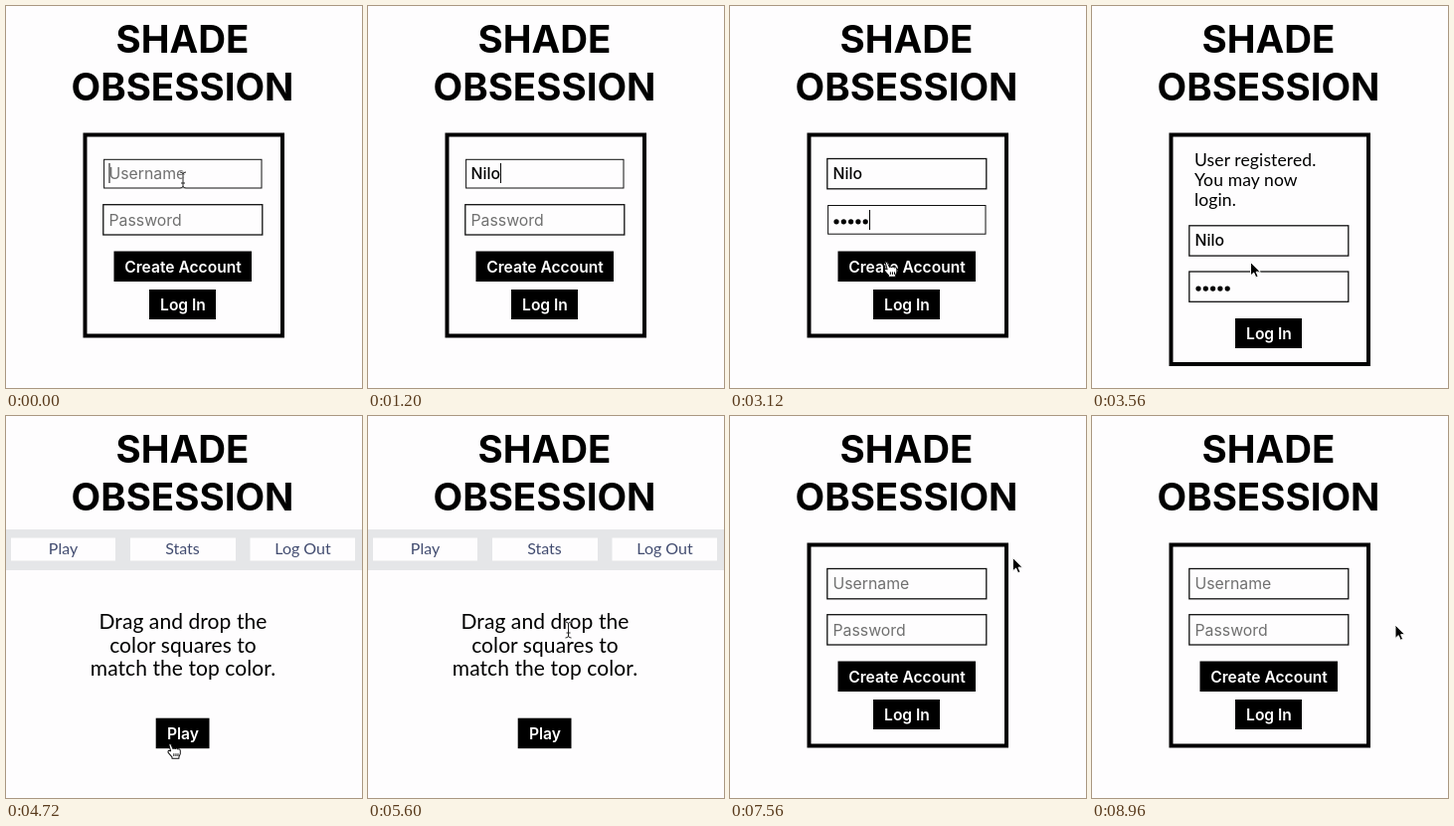
These frames come from a looping animation (358 by 384 pixels, 9000 ms). An HTML page:

```html
<!DOCTYPE html>
<html lang="en">
<head>
<meta charset="utf-8">
<title>Color game login</title>
<style>
  html, body { margin: 0; width: 100%; height: 100%; overflow: hidden; background: #fefdfe; }
  svg { display: block; width: 358px; height: 384px; }
  text { font: 15.8px Inter, sans-serif; white-space: pre; }
  .mid text { text-anchor: middle; }
  .title text { font-size: 38.5px; font-weight: 700; }
  .intro text { font: 21px Lato, sans-serif; letter-spacing: .08px; }
  .note text { font: 17.5px Lato, sans-serif; letter-spacing: .12px; }
  .nav rect { fill: #fefdfe; }
  .nav text { font: 16px Lato, sans-serif; fill: #424c70; }
  .button text { font-size: 15.6px; font-weight: 600; fill: #fff; }
  .field rect { fill: #fefdfe; stroke: #111; stroke-width: 1.3; }
  .field.focus rect { stroke-width: 1; }
  .field text { font-weight: 500; }
  .field .hint { font-weight: 400; fill: #707070; }
  .caret { stroke: #000; stroke-width: 1; }
</style>
</head>
<body>
<svg viewBox="0 0 358 384">
  <defs><path id="bar" d="M-3 -8Q0 -8 0 -6Q0 -8 3 -8M0 -6V6M-3 8Q0 8 0 6Q0 8 3 8M-2 3H2"/></defs>
  <g class="title mid"><text x="177.500" y="47">SHADE</text><text x="177.500" y="95">OBSESSION</text></g>

  <g id="form">
    <rect id="box" x="79.500" y="129.500" width="198.500" fill="none" stroke="#000" stroke-width="4"/>
    <g id="note" class="note">
      <text x="103" y="161">User registered.</text>
      <text x="103" y="181">You may now</text>
      <text x="103" y="200.500">login.</text>
    </g>
    <g id="fields">
      <g id="user" class="field"><rect/><text x="103.500" y="174"></text></g>
      <g id="pass" class="field"><rect/><text x="103.500" y="221" class="hint">Password</text><g id="dots"></g></g>
      <path id="caret" class="caret"/>
    </g>
    <g id="create" class="button mid"><rect x="108.500" y="246.500" width="138.500" height="30.500"/><text x="178" y="268">Create Account</text></g>
    <g id="login" class="button mid"><rect x="144" y="285" width="67" height="30"/><text x="178" y="306">Log In</text></g>
  </g>

  <g id="home">
    <rect y="114" width="358" height="41" fill="#e5e6e8"/>
    <g class="nav mid">
      <rect x="5" y="122.500" width="105" height="23"/><text x="57.500" y="139">Play</text>
      <rect x="125" y="122.500" width="106" height="23"/><text x="177.500" y="139">Stats</text>
      <rect x="245.500" y="122.500" width="105.500" height="23"/><text x="298.500" y="139">Log Out</text>
    </g>
    <g class="intro mid">
      <text x="178" y="214">Drag and drop the</text>
      <text x="178" y="237.500">color squares to</text>
      <text x="178" y="261">match the top color.</text>
    </g>
    <g class="button mid"><rect x="150.700" y="303.700" width="53.800" height="30.500"/><text x="178" y="325">Play</text></g>
  </g>

  <g id="pointer">
    <path id="arrow" d="M0 0V13.500L3.200 10.600L5.300 15.300L7.600 14.300L5.600 9.700H9.800Z" stroke="#fff" stroke-width="1"/>
    <g id="beam" fill="none">
      <use href="#bar" stroke="#fff" stroke-width="2.400" opacity=".7"/>
      <use href="#bar" stroke="#222"/>
    </g>
    <path id="hand" transform="scale(.92)" d="M-1.500 8L-3.300 1.500Q-3.300 -.5 -1.500 0L1 5.500Q2 4.300 3.500 5.500Q5 4.300 6.300 6Q8.500 5 9 7.500V11L7.500 14.500V16H0V14.500L-4 10Q-5 7.800 -3.400 7.300ZM2 10.500V13.500M4.300 10.500V13.500M6.500 10.500V13.500" fill="#fff" stroke="#111" stroke-width="1.100" stroke-linejoin="round"/>
  </g>
</svg>
<script>
const $ = id => document.getElementById(id);
const show = (id, on) => $(id).style.display = on ? '' : 'none';
const set = (el, attrs) => { for (const k in attrs) el.setAttribute(k, attrs[k]); };

const LOOP = 9000, NAME = 'Nilo';
const REGISTERED = 3400, LOGGED_IN = 4680, LOGGED_OUT = 6560;

// Pointer stops: time, x, y
const path = [
  [0, 178, 175], [2560, 178, 175], [3120, 159.5, 257.5], [3600, 159.5, 257.5],
  [4280, 167, 329.5], [4960, 167, 329.5], [5560, 201.5, 215], [5720, 201.5, 215],
  [6320, 283, 138], [7440, 283, 138], [8240, 305, 210], [LOOP, 305, 210]
];

function pointerAt(t) {
  const i = path.findIndex(p => p[0] > t);
  const [a, b] = [path[i - 1], path[i]];
  const u = (t - a[0]) / (b[0] - a[0]), e = u * u * (3 - 2 * u);
  return [a[1] + (b[1] - a[1]) * e, a[2] + (b[2] - a[2]) * e];
}

function pointerShape(x, y, page) {
  const over = (x0, y0, x1, y1) => x >= x0 && x <= x1 && y >= y0 && y <= y1;
  if (page === 'home') {
    if (over(245, 122, 351, 146) || over(151, 304, 204, 334)) return 'hand';
    return over(85, 196, 271, 266) ? 'beam' : 'arrow';
  }
  const dy = page === 'done' ? 67 : 0;
  if (over(97, 153 + dy, 258, 184 + dy) || over(97, 199 + dy, 258, 230 + dy)) return 'beam';
  if (dy ? over(144, 314, 211, 344) : over(109, 247, 247, 277)) return 'hand';
  return 'arrow';
}

function drawField(id, y, focus) {
  const g = $(id), inset = focus ? 0.8 : 0;
  g.setAttribute('class', focus ? 'field focus' : 'field');
  set(g.firstElementChild, { x: 97.8 + inset, y: y + inset, width: 160 - 2 * inset, height: 30.3 - 2 * inset });
}

function drawForm(t, page) {
  const done = page === 'done', fresh = t >= LOGGED_OUT;
  const typed = (start, gap, max) => fresh ? 0 : Math.max(0, Math.min(max, Math.floor((t - start) / gap) + 1));
  const letters = typed(600, 160, NAME.length), count = typed(1560, 150, 5);
  const focus = done || fresh ? '' : t < 1360 ? 'user' : 'pass';

  show('note', done);
  show('create', !done);
  $('box').setAttribute('height', done ? 230.5 : 202);
  $('fields').setAttribute('transform', `translate(0 ${done ? 67.3 : 0})`);
  $('login').setAttribute('transform', `translate(0 ${done ? 29 : 0})`);
  drawField('user', 153.5, focus === 'user');
  drawField('pass', 199.7, focus === 'pass');

  const name = $('user').lastElementChild;
  name.textContent = letters ? NAME.slice(0, letters) : 'Username';
  name.setAttribute('class', letters ? '' : 'hint');
  $('pass').children[1].style.display = count ? 'none' : '';
  [...$('dots').children].forEach((d, i) => d.style.display = i < count ? '' : 'none');

  const typing = (t > 600 && t < 1360) || (t > 1560 && t < 2660);
  show('caret', focus && (typing || t % 1000 < 500));
  const x = focus === 'user'
    ? 104 + (letters ? name.getComputedTextLength() : 0)
    : 104 + 7.3 * count;
  $('caret').setAttribute('d', `M${x} ${focus === 'user' ? 158 : 205}v20`);
}

function draw(t) {
  const page = t < REGISTERED || t >= LOGGED_OUT ? 'login' : t < LOGGED_IN ? 'done' : 'home';
  show('form', page !== 'home');
  show('home', page === 'home');
  if (page !== 'home') drawForm(t, page);

  const [x, y] = pointerAt(t), shape = pointerShape(x, y, page);
  show('pointer', t < 600 || t >= 2560); // hidden while typing
  for (const id of ['arrow', 'beam', 'hand']) show(id, id === shape);
  $('pointer').setAttribute('transform', `translate(${x} ${y})`);
}

for (let i = 0; i < 5; i++) {
  const dot = document.createElementNS('http://www.w3.org/2000/svg', 'circle');
  set(dot, { cx: 107 + 7.3 * i, cy: 216.8, r: 2.6 });
  $('dots').append(dot);
}

const start = performance.now();
function frame() {
  draw((performance.now() - start) % LOOP);
  requestAnimationFrame(frame);
}
frame();
</script>
</body>
</html>
```
